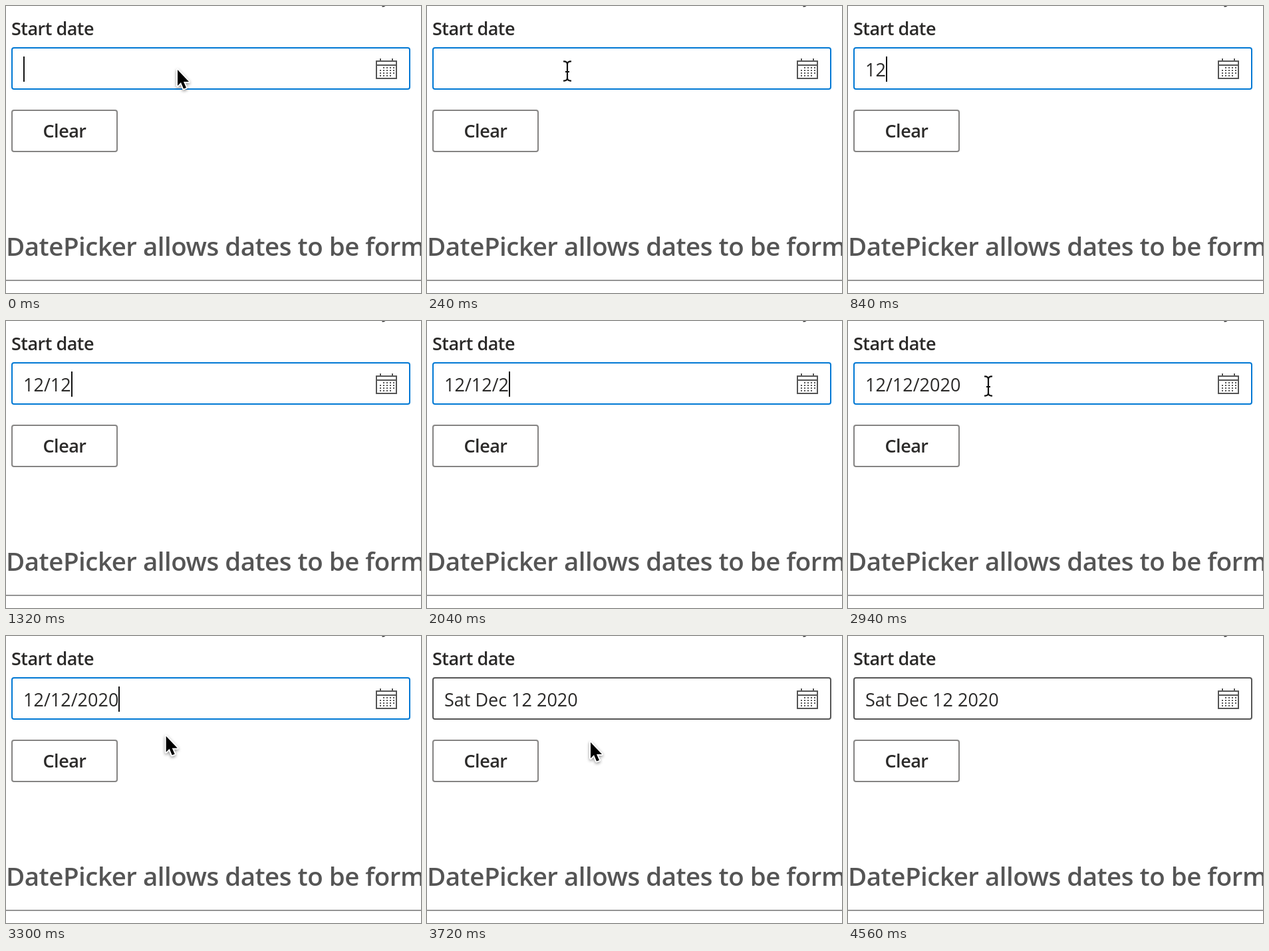
An HTML page that plays this animation: 624 px wide and 432 px high, repeating every 5100 ms.

```html
<!DOCTYPE html>
<html lang="en">
<head>
<meta charset="utf-8">
<title>Date field</title>
<style>
html, body { margin: 0; width: 100%; height: 100%; overflow: hidden; background: #fff; }
svg { display: block; width: 624px; height: 432px; }
text { font: 27px "Open Sans", "Noto Sans", sans-serif; fill: #2b2a29; }
.bold { font-weight: 600; letter-spacing: -.5px; }
.heading { font-size: 38.5px; font-weight: 600; letter-spacing: -.5px; fill: #555; }
.box { fill: #fff; stroke-width: 2; }
.icon { fill: none; stroke: #555; stroke-width: 2; }
#arrow { paint-order: stroke; stroke: #fff; stroke-width: 4; stroke-linejoin: round; filter: drop-shadow(0 2px 2px #0006); }
#beam { fill: none; stroke: #111; stroke-width: 2.2; }
</style>
</head>
<body>
<svg viewBox="0 0 624 432">
  <path d="M565.5 .5Q569 .5 570 -1" fill="none" stroke="#333" stroke-width="2"/>
  <text class="bold" x="8" y="44">Start date</text>
  <rect id="field" class="box" x="9" y="63" width="598" height="62" rx="3"/>
  <text id="value" x="26" y="106"></text>
  <rect id="caret" y="76" width="2" height="38" fill="#111"/>

  <g class="icon">
    <path d="M557 83H587V109H557ZM557 89H587M563 79V84M581 79V84"/>
    <path d="M567 93H584M562 97H584M562 101H584M562 105H579" stroke-dasharray="2 3"/>
  </g>

  <rect class="box" x="9" y="157" width="158" height="62" rx="3" stroke="#858483"/>
  <text class="bold" x="88" y="198" text-anchor="middle">Clear</text>
  <text class="heading" x="0" y="376">DatePicker allows dates to be form</text>
  <path d="M0 413H624" stroke="#949494" stroke-width="2"/>

  <path id="arrow" d="M1 2V26L6 21L10 30.5L14 29L10 20H18Z"/>
  <path id="beam" d="M-6 -14.5Q0 -15 0 -10Q0 -15 6 -14.5M0 -11V11M-6 14.5Q0 15 0 10Q0 15 6 14.5M-3 1H3"/>
</svg>
<script>
const LOOP = 5100, STEP = 60;
const TYPE = 660, BURST = 450, KEY = 90, MOVE = 2940, BLUR = 3660;
const bursts = ["12", "/12", "/", "2020"];
const [field, value, caret, arrow, beam] =
  ["field", "value", "caret", "arrow", "beam"].map(id => document.getElementById(id));

const ramp = (t, from, to) => Math.min(1, Math.max(0, (t - from) / (to - from)));
const ease = (t, from, to) => {
  const p = ramp(t, from, to);
  return p * p * (3 - 2 * p);
};

// Each burst of keys starts at a steady beat.
const typedText = t => bursts.map((keys, i) =>
  keys.slice(0, Math.max(0, Math.floor((t - TYPE - i * BURST) / KEY) + 1))).join("");

const caretOpacity = t => t >= BLUR ? 0 :
  1 - ramp(t, 120, 240) + ramp(t, 600, TYPE) - ramp(t, 2580, 2760) + ramp(t, 3060, 3180);

function drawPointer(t) {
  const enter = ramp(t, 120, 240), move = ease(t, MOVE, 3420), leave = ease(t, 4320, 4560);
  const x = 257 - 46 * enter + 34 * move - 242 * leave;
  const y = 94 + 4 * enter + 60 * move + 148 * leave;
  const hidden = t >= TYPE && t < MOVE || leave === 1;
  const shape = t < 180 || y > 118 ? arrow : beam;
  for (const el of [arrow, beam]) {
    el.setAttribute("visibility", el === shape && !hidden ? "visible" : "hidden");
    el.setAttribute("transform", `translate(${x} ${y})`);
  }
}

function draw(now) {
  const t = Math.floor(now % LOOP / STEP) * STEP;
  const text = typedText(t);
  value.textContent = t < BLUR ? text : "Sat Dec 12 2020";
  field.setAttribute("stroke", t < BLUR ? "#0078d4" : "#555");
  caret.setAttribute("x", Math.round(26 + (text ? value.getComputedTextLength() : 0)));
  caret.setAttribute("opacity", caretOpacity(t));
  drawPointer(t);
}

const start = performance.now();
function tick() {
  draw(performance.now() - start);
  requestAnimationFrame(tick);
}
tick();
</script>
</body>
</html>
```
